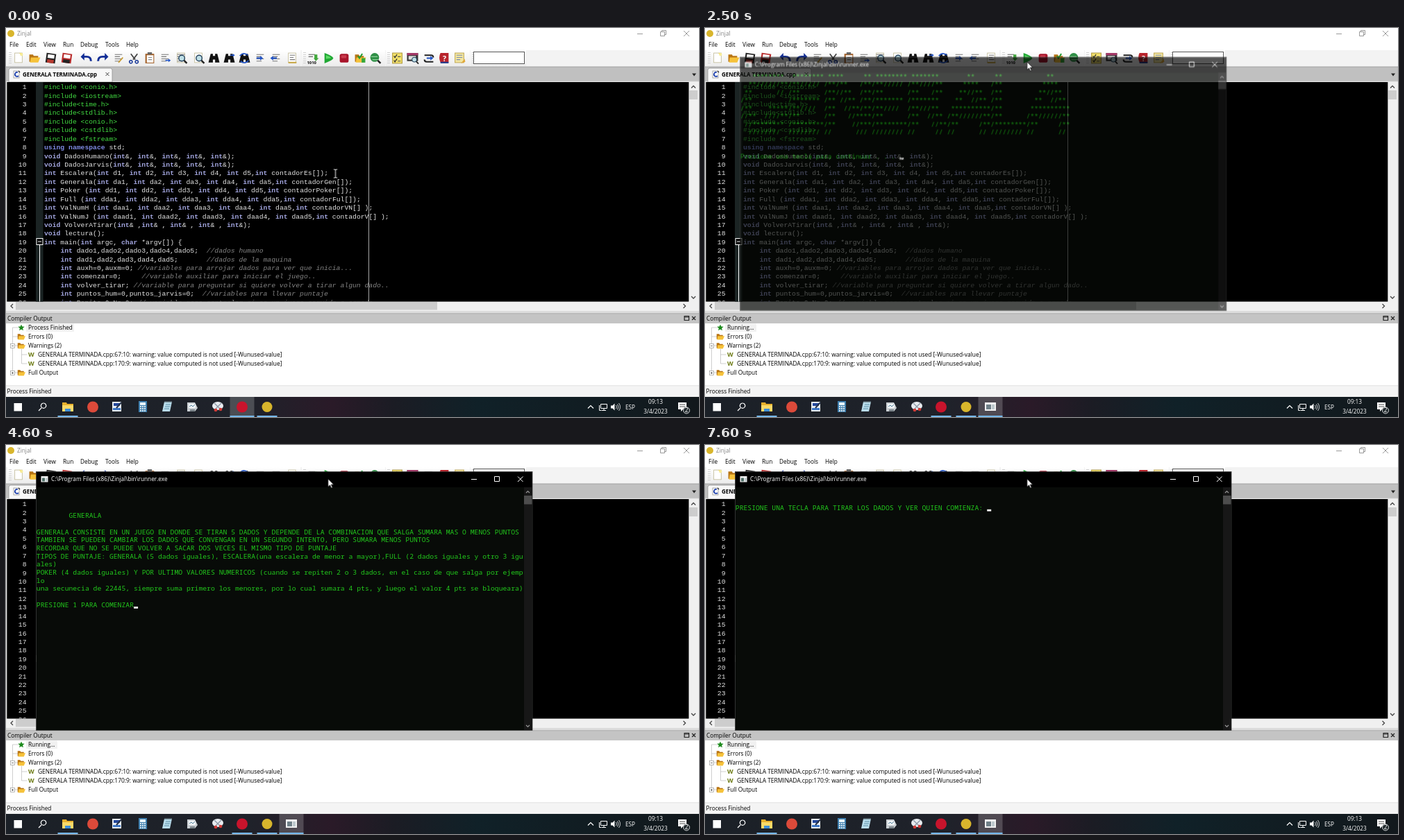
Write an HTML page that moves like this. It is 998 by 561 pixels and loops after 8000 ms.

```html
<!DOCTYPE html>
<html lang="es">
<head>
<meta charset="utf-8">
<title>ZinjaI</title>
<style>
html, body { margin: 0; width: 100%; height: 100%; overflow: hidden; background: #fff; }
svg { display: block; width: 998px; height: 561px; }
text { font: 8.25px "Open Sans", "Noto Sans", sans-serif; white-space: pre; }
.log { font-size: 8.42px; }
.code { font: 9.742px "Liberation Mono", monospace; fill: #e4e4e4; }
.con { font: 9.742px "Noto Sans Mono", "DejaVu Sans Mono", monospace; fill: #22c81c; }
.pre { fill: #42dc42; }
.kw { fill: #7f8be4; font-weight: 700; }
.type { fill: #a3a6e0; font-weight: 700; }
.note { fill: #848484; font-style: italic; }

.a { animation: 8s step-end infinite; }
.hint { animation-name: hint; }
.plain { animation-name: plain; }
.before { animation-name: before; }
.after { animation-name: after; }
.active { animation-name: active; }
.opened { animation-name: opened; }
.ibeam { animation-name: ibeam; }
.arrow { animation-name: arrow; }
.s1 { animation-name: s1; } .s2 { animation-name: s2; } .s3 { animation-name: s3; }
.c1 { animation-name: c1; } .c2 { animation-name: c2; }
.win { animation-name: win; transform-origin: 401px 224.7px; }
.ptr { animation-name: ptr; }
@keyframes hint { 0% { opacity: 0 } 18.75% { opacity: 1 } 21.25%, 100% { opacity: 0 } }
@keyframes plain { 0% { opacity: 1 } 18.75% { opacity: 0 } 21.25%, 100% { opacity: 1 } }
@keyframes before { 0% { opacity: 1 } 23.75%, 100% { opacity: 0 } }
@keyframes after { 0% { opacity: 0 } 23.75%, 100% { opacity: 1 } }
@keyframes active { 0% { opacity: 0 } 23.75% { opacity: 1 } 30%, 100% { opacity: 0 } }
@keyframes opened { 0% { opacity: 0 } 30%, 100% { opacity: 1 } }
@keyframes ibeam { 0% { opacity: 1 } 17.5%, 100% { opacity: 0 } }
@keyframes arrow { 0% { opacity: 0 } 17.5%, 100% { opacity: 1 } }
@keyframes s1 { 0% { opacity: 1 } 55%, 100% { opacity: 0 } }
@keyframes s2 { 0% { opacity: 0 } 55% { opacity: 1 } 81.25%, 100% { opacity: 0 } }
@keyframes s3 { 0% { opacity: 0 } 81.25%, 100% { opacity: 1 } }
@keyframes c1 { 0% { opacity: 1 } 51.25%, 100% { opacity: 0 } }
@keyframes c2 { 0% { opacity: 1 } 70%, 100% { opacity: 0 } }
@keyframes win {
  0% { opacity: 0; transform: scale(.9) }
  30% { opacity: .3; transform: scale(.94) }
  31.25% { opacity: .67; transform: scale(.98) }
  32.5%, 100% { opacity: 1; transform: none }
}
@keyframes ptr {
  0% { transform: translate(474.5px, 210px) }
  11.25% { transform: translate(474.5px, 210px); animation-timing-function: steps(5, jump-start) }
  17.49% { transform: translate(486px, 94px) }
  17.5% { transform: translate(500px, 66px) }
  18.75% { transform: translate(510px, 49px) }
  20% { transform: translate(482px, 55.5px) }
  21.25% { transform: translate(468px, 51px) }
  22.5%, 100% { transform: translate(463.8px, 48.8px) }
}
</style>
</head>
<body>
<svg id="stage" viewBox="0 0 998 561" xmlns="http://www.w3.org/2000/svg"></svg>
<script>
const esc = s => s.replace(/&/g, '&amp;').replace(/</g, '&lt;');
const rect = (x, y, w, h, fill, more = '') => `<rect x="${x}" y="${y}" width="${w}" height="${h}" fill="${fill}" ${more}/>`;
const text = (x, y, s, more = '') => `<text x="${x}" y="${y}" ${more}>${esc(s)}</text>`;
const line = (d, stroke, w = 1, more = '') => `<path d="${d}" fill="none" stroke="${stroke}" stroke-width="${w}" ${more}/>`;
const shape = (d, fill, more = '') => `<path d="${d}" fill="${fill}" ${more}/>`;
const disc = (x, y, r, fill) => `<circle cx="${x}" cy="${y}" r="${r}" fill="${fill}"/>`;
const at = (x, y, s, k = 1) => `<g transform="translate(${x} ${y}) scale(${k})">${s}</g>`;
const anim = (name, s) => `<g class="a ${name}">${s}</g>`;

// Icon parts, centred on the origin
const page = rect(-5, -7, 10, 13, '#fff', 'stroke="#b9b28a" stroke-width=".7"');
const rows = line('M-5-5h10M-5-2h7M-5 1h10M-5 4h7', '#777');
const lens = disc(0, 0, 4, '#bfdfe6') + line('M3 3l4 4', '#222', 2.2) + '<circle r="4" fill="none" stroke="#24425c" stroke-width="1.3"/>';
const folder = shape('M-7-5h5l1 2h6v8h-12z', '#b87414') + shape('M-5-1h13l-3 7h-11z', '#f6c23a');
const floppy = (edge, label) => `<g transform="rotate(8)">${rect(-6, -6.5, 13, 13, edge) + rect(-4, -5, 9, 5, '#fff') + rect(-4, 2, 9, 4.5, label)}</g>`;
const bino = shape('M-7 6l3-12h3v3h3v-3h3l3 12h-6v-4h-3v4z', '#111');
const curve = line('M6 4q0-6-6-6h-4', '#122e96', 2.8) + shape('M-8-2l5-5v10z', '#122e96');
const arrowR = line('M-3 0h6', '#2456c8', 2) + shape('M2-3l4 3-4 3z', '#2456c8');
const flip = s => `<g transform="scale(-1 1)">${s}</g>`;
const check = c => line('M-3 0l2 3 4-6', c, 1.8);

const icons = [
  [18, page + shape('M1-7h4v4z', '#f4d64a') + disc(4, -5, 2, '#f7ec9a')],
  [41, folder],
  [64, floppy('#222', '#b83a30')],
  [87, floppy('#b82a2a', '#222')],
  [116, curve],
  [139, flip(curve)],
  [162, rows + line('M0 6l6-7', '#c79a30', 1.6)],
  [184, line('M-4-6l6 8M5-6l-6 8', '#444', 1.6) + line('M-4 3a2 2 0 1 0 .1 0M4 3a2 2 0 1 0 .1 0', '#23419c', 1.6)],
  [207, rect(-6, -6, 12, 13, '#a4622a') + rect(-4, -4, 9, 10, '#fff') + rect(-3, -8, 6, 3, '#666') + line('M-2-1h5M-2 2h5', '#888')],
  [229, rows + at(3, 3, arrowR, .8)],
  [252, page + rows + at(1, 0, lens)],
  [277, page + at(1, 0, lens)],
  [299, bino],
  [321, bino + at(4, -4, arrowR, .7)],
  [343, bino + line('M-6-3q5-6 11-1M6 3q-5 6-11 1', '#2456c8', 1.6)],
  [366, rows + at(-2, 0, arrowR)],
  [389, rows + at(-2, 0, flip(arrowR))],
  [412, page + line('M-3-4h7M-3-1h5M-3 2h7', '#777') + line('M-5 6h11', '#c8a848', 2)],
  [442, line('M-6-5h9M-6-2h6', '#666') + shape('M2-5h4v5h2l-4 4-3-4h1z', '#41a83c') + text(-8, 8, '1010', 'style="font-size:5.5px;font-weight:700"')],
  [464, shape('M-5-7q11 4 12 7q-1 3-12 7z', '#20a834') + shape('M-3-4q6 2 7 4l-7 1z', '#5cda65')],
  [487, rect(-6, -6, 12, 12, '#a8142a', 'rx="2.5"') + rect(-4, -4, 7, 4, '#c83a4c', 'rx="1"')],
  [510, folder + at(0, -3, check('#1d9c30')) + rect(2, 0, 5, 6, '#35a83a')],
  [532, disc(-1, -1, 6, '#2f8f46') + line('M-6-2h9M-4 2h8', '#8fd09a') + line('M3 3l4 4', '#222', 2.4)],
  [563, rect(-6, -7, 13, 14, '#f2e06a', 'stroke="#b09a40"') + at(-2, -3, check('#333'), .7) + at(-2, 3, check('#333'), .7) + line('M1-2h4M1 4h4', '#555')],
  [586, rect(-8, -7, 15, 11, '#333') + rect(-8, -7, 15, 3, '#a83a6a') + rect(-6, -3, 10, 5, '#ddd') + at(2, 2, lens, .8)],
  [609, line('M-6-4h9q3 0 3 3M6 5h-9q-3 0-3-3', '#222', 2) + arrowR],
  [631, shape('M-5-7h11v13h-11q-3-7 0-13z', '#b8242c') + text(-2, 4, '?', 'style="font-size:10px;font-weight:700" fill="#fff"') + line('M-5 6h11', '#223a8c', 2)],
  [653, rect(-6, -7, 12, 13, '#f3e6a0', 'stroke="#c2aa58"') + line('M-4-4h8M-4-1h8M-4 2h5', '#7a8cae') + shape('M2 7l5-6 1 4z', '#e2a83a')]
];

function frame() {
  const buttons = c => line('M909 8.5h8M976 4l8 8M984 4l-8 8M942.5 5.5h6v6h-6zM944.5 5v-1.5h6v6h-2', c, .8);
  let s = rect(0, 0, 998, 532, '#fff') + disc(7, 8, 5, '#d8b52c');
  s += text(16, 11.3, 'ZinjaI', 'fill="#858585"') + buttons('#808080');
  s += anim('active', text(16, 11.3, 'ZinjaI') + buttons('#000'));
  [['File', 5], ['Edit', 29], ['View', 54], ['Run', 82], ['Debug', 107], ['Tools', 143], ['Help', 173]]
    .forEach(([t, x]) => s += text(x, 27, t));
  s += rect(0, 32, 998, 24, '#f3f3f3');
  [[2, 422], [426, 120], [547, 121], [669, 80]].forEach(([x, w]) => {
    s += rect(x, 32, w, 23, 'url(#bar)') + line(`M${x + 3} 35v17M${x + 5} 35v17`, '#aaa', 1, 'stroke-dasharray="1 2"');
  });
  s += anim('hint', rect(499, 33, 22, 21, '#cfe6fb', 'stroke="#8fc3ee" stroke-width=".8"'));
  icons.forEach(([x, g]) => s += at(x, 43.5, g, 1.06));
  s += rect(673.5, 34.5, 73, 17, '#fff', 'stroke="#555"');
  // tab strip
  s += rect(0, 56, 998, 22, '#c0c0c0') + rect(0, 55.5, 998, 1, '#a2a2a2') + rect(0, 76.8, 998, 1.2, '#e4e4e4');
  s += shape('M4 78v-18l2-2h145l2 2v18z', '#f8f8f8', 'stroke="#8a8a8a" stroke-width=".7"');
  s += rect(11, 62, 8, 10, '#fff', 'stroke="#888" stroke-width=".7"') + line('M17 64a3 3 0 1 0 1 5', '#2446b0', 1.8) + line('M18 62l2 2', '#333', 1.4);
  s += text(24, 69.5, 'GENERALA TERMINADA.cpp', 'style="font-weight:700;font-size:7.9px"');
  s += line('M143.5 64l5 5M148.5 64l-5 5', '#444') + shape('M988 65.5h6l-3 4z', '#222');
  return s;
}

const args = name => [1, 2, 3, 4, 5].map(i => `int ${name}${i}`).join(', ');
const include = h => '#include ' + h;
const source = [
  ...['<conio.h>', '<iostream>'].map(include), '#include<time.h>', '#include<stdlib.h>',
  ...['<conio.h>', '<cstdlib>', '<fstream>'].map(include),
  'using namespace std;',
  'void DadosHumano(int&, int&, int&, int&, int&);',
  'void DadosJarvis(int&, int&, int&, int&, int&);',
  `int Escalera(${args('d')},int contadorEs[]);`,
  `int Generala(${args('da')},int contadorGen[]);`,
  `int Poker (${args('dd')},int contadorPoker[]);`,
  `int Full (${args('dda')},int contadorFul[]);`,
  `int ValNumH (${args('daa')},int contadorVN[] );`,
  `int ValNumJ (${args('daad')},int contadorV[] );`,
  'void VolverATirar(int& ,int& , int& , int& , int&);',
  'void lectura();',
  'int main(int argc, char *argv[]) {',
  '    int dado1,dado2,dado3,dado4,dado5;  //dados humano',
  '    int dad1,dad2,dad3,dad4,dad5;       //dados de la maquina',
  '    int auxh=0,auxm=0; //variables para arrojar dados para ver que inicia...',
  '    int comenzar=0;     //variable auxiliar para iniciar el juego..',
  '    int volver_tirar; //variable para preguntar si quiere volver a tirar algun dado..',
  '    int puntos_hum=0,puntos_jarvis=0;  //variables para llevar puntaje',
  '    int Repite_O_No=0; // variable para controlar si es un juego servido o armado'
];
const paint = s => esc(s).replace(/^#.*|\/\/.*|\b(using|namespace)\b|\b(void|int|char)\b/g, (m, kw, type) =>
  `<tspan class="${kw ? 'kw' : type ? 'type' : m[0] === '#' ? 'pre' : 'note'}">${m}</tspan>`);

function editor() {
  let s = rect(0, 78, 998, 331, '#f0f0f0') + rect(1.3, 78, 982, 316.6, '#000') + rect(43, 78, 10.5, 316.6, '#1b2424');
  s += '<g clip-path="url(#ed)">' + rect(522, 78, 1, 317, '#a8a8a8');
  source.forEach((t, i) => {
    const y = 88.2 + 12.42 * i;
    s += text(29.5, y, String(i + 1), 'class="code" text-anchor="end"');
    s += `<text class="code" x="55" y="${y}">${paint(t)}</text>`;
  });
  s += rect(44, 303.5, 9, 9, '#000', 'stroke="#fff"') + line('M46 308h5M48.5 313v82', '#fff') + '</g>';
  s += rect(984, 90, 12, 13, '#cdcdcd') + rect(14, 395, 607, 11.5, '#cdcdcd');
  s += line('M987 86.5l3-3 3 3M987 387l3 3 3-3M10 398l-3 3 3 3M975.5 398l3 3-3 3', '#444', 1.3);
  s += rect(0, 408, 998, 4, '#dcdcdc');
  return s;
}

function output() {
  let s = rect(0, 412, 998, 14, '#c4c4c4') + rect(0, 411.5, 998, .7, '#9a9a9a') + text(2, 422, 'Compiler Output');
  s += line('M977 415.5h6.5v6h-6.5zM977 417h6.5M988 416l5 5M993 416l-5 5', '#222', 1.2);
  s += rect(1, 426, 996, 90, '#fff');
  s += line('M9.5 432v65M9.5 432h8M9.5 445h8M12 458h6M12 497h6M22.5 463v21M22.5 471h8M22.5 484h8', '#bbb', .7);
  const mark = y => rect(6.5, y - 2.5, 6, 6, '#fff', 'stroke="#999" stroke-width=".7"');
  s += mark(458) + mark(497) + line('M8 458.5h3M8 497.5h3M9.5 496v3', '#444', .7);
  s += shape('M22 427.5l1.3 3 3.4.3-2.6 2.2.8 3.3-2.9-1.800-2.900 1.800.8-3.300-2.600-2.200 3.400-.3z', '#1c8a1c');
  [445, 458, 497].forEach(y => s += at(22, y, folder, .75));
  s += anim('before', rect(29, 426.5, 69, 11.5, '#f1f1f1') + text(32, 434.8, 'Process Finished'));
  s += anim('after', rect(29, 426.5, 45, 11.5, '#f1f1f1') + text(32, 434.8, 'Running...'));
  s += text(32, 447.9, 'Errors (0)') + text(32, 461, 'Warnings (2)') + text(32, 500.2, 'Full Output');
  ['67:10', '170:9'].forEach((p, i) => {
    const y = 474 + 13.1 * i;
    s += text(32, y, 'W', 'style="font-weight:700;font-size:9px" fill="#6c7a14"');
    s += text(46, y, `GENERALA TERMINADA.cpp:${p}: warning: value computed is not used [-Wunused-value]`, 'class="log"');
  });
  s += rect(0, 516, 998, 16, '#f4f4f4') + rect(0, 515.5, 998, .7, '#d4d4d4');
  s += anim('plain', text(1.5, 527, 'Process Finished'));
  s += anim('hint', text(1.5, 527, 'Configura la compilación y ejecución de los programas'));
  return s;
}

function taskbar() {
  const under = x => rect(x - 14.5, 559, 29, 2, '#76b9ed');
  const lit = x => rect(x - 17.5, 532, 35, 29, '#fff', 'opacity=".2"') + rect(x - 17.5, 559, 35, 2, '#76b9ed');
  const white = 'fill="#fff"', mid = 'fill="#fff" text-anchor="middle"';
  let s = rect(0, 532, 998, 29, 'url(#task)');
  s += rect(11.5, 541, 11.5, 11.5, '#fff');
  s += line('M54 541a3.7 3.7 0 1 0 .1 0M51 548l-4 4', '#fff', 1.2);
  s += under(89) + under(376) + anim('before', lit(340)) + anim('after', under(340)) + anim('active', lit(376)) + anim('opened', lit(411));
  s += at(89, 546, shape('M-8-6h6l1 2h9v10h-16z', '#e8b02c') + rect(-8, -2, 16, 9, '#fbd968') + rect(-4, 3, 8, 4, '#3f8fd8'));
  s += disc(125, 546.5, 8, '#dc4a3a');
  s += at(160, 546, rect(-7, -7, 13, 14, '#e8eef4') + rect(-5, -5, 9, 4, '#24489c') + rect(-6, 2, 11, 3, '#3f78c8') + line('M-1 2l7-8', '#27344a', 2));
  s += at(197, 546, rect(-6, -8, 12, 16, '#3f7fae') + rect(-4, -6, 8, 4, '#e8f4fa') + line('M-4 0h8M-4 3h8M-4 6h8', '#dceaf2', 1.8, 'stroke-dasharray="2 1"'));
  s += at(232, 546, shape('M-4-7h11l-3 14h-11z', '#b9dceb') + line('M-2-3h7M-3 0h7M-4 3h7', '#5c90a8') + line('M-4-7h11', '#5a6a72', 1.5));
  s += at(268, 546, shape('M-7-6h11l4 8-4 5h-11z', '#c9ced2') + rect(-5, -4, 10, 6, '#f3f6f8') + line('M-4 0l3-2 2 2 3-3', '#4a7a96') + rect(-3, 4, 7, 3, '#7c858b'));
  s += at(305, 546, '<ellipse cx="0" cy="-1" rx="8" ry="6" fill="#e8ecf0"/>' + line('M-5-5l9 9M5-5l-8 8', '#8c99a6', 1.4) + disc(-3, 5, 2.3, '#d03a36') + disc(4, 4, 2.3, '#d03a36'));
  s += disc(340, 546.5, 8, '#c8142c') + disc(376, 546.5, 7.5, '#d8b52c');
  s += anim('opened', at(411, 546, rect(-8, -6, 16, 12, '#f2f2f2') + rect(-6, -3, 7, 7, '#6f8088') + rect(2, -3, 4, 7, '#bcc8cc')));
  s += line('M838 548.5l4-4 4 4', '#fff', 1.2);
  s += line('M856.5 542.5h9v6h-9zM861 549v2.5M858 551.5h6M854.5 544v7.5h3', '#fff');
  s += shape('M871 544.5h2.5l3-3v10l-3-3h-2.5z', '#fff') + line('M878.5 544q2 2.5 0 5M880.5 542.5q3 4 0 8M882.5 541q4 5.5 0 11', '#fff', .8);
  s += text(892, 549.5, 'ESP', white) + text(935.5, 542.3, '09:13', mid) + text(935.5, 555.5, '3/4/2023', mid);
  s += shape('M968 540h12v10h-5l-3 3v-3h-4z', '#fff') + line('M970 543h8M970 546h8', '#222', .8);
  s += disc(980, 551.5, 5, '#20282c') + '<circle cx="980" cy="551.5" r="4.5" fill="none" stroke="#fff" stroke-width=".8"/>' + text(980, 554.4, '2', mid);
  return s;
}

// Banner letters: width, then eight rows
const glyphs = {
  G: [12, '   ********|  **//////**| **      //|/**|/**    *****|//**  ////**| //********|  ////////'],
  E: [9, ' ********|/**/////|/**|/*******|/**////|/**|/********|////////'],
  N: [12, ' ****     **|/**/**   /**|/**//**  /**|/** //** /**|/**  //**/**|/**   //****|/**    //***|//      ///'],
  R: [10, ' *******|/**////**|/**   /**|/*******|/**///**|/**  //**|/**   //**|//     //'],
  A: [11, '     **|    ****|   **//**|  **  //**| **********|/**//////**|/**     /**|//      //'],
  L: [9, ' **|/**|/**|/**|/**|/**|/********|////////']
};
const banner = [...Array(8).keys()].map(r =>
  [...'GENERALA'].map(c => glyphs[c][1].split('|')[r].padEnd(glyphs[c][0])).join(''));
const pause = 'Presione una tecla para continuar . . . ';
const rules = ['', '', '', '        GENERALA', '',
  'GENERALA CONSISTE EN UN JUEGO EN DONDE SE TIRAN 5 DADOS Y DEPENDE DE LA COMBINACION QUE SALGA SUMARA MAS O MENOS PUNTOS',
  'TAMBIEN SE PUEDEN CAMBIAR LOS DADOS QUE CONVENGAN EN UN SEGUNDO INTENTO, PERO SUMARA MENOS PUNTOS',
  'RECORDAR QUE NO SE PUEDE VOLVER A SACAR DOS VECES EL MISMO TIPO DE PUNTAJE',
  'TIPOS DE PUNTAJE: GENERALA (5 dados iguales), ESCALERA(una escalera de menor a mayor),FULL (2 dados iguales y otro 3 igu',
  'ales)',
  'POKER (4 dados iguales) Y POR ULTIMO VALORES NUMERICOS (cuando se repiten 2 o 3 dados, en el caso de que salga por ejemp',
  'lo',
  'una secunecia de 22445, siempre suma primero los menores, por lo cual sumara 4 pts, y luego el valor 4 pts se bloqueara)',
  '', 'PRESIONE 1 PARA COMENZAR'];
const start = ['', '', 'PRESIONE UNA TECLA PARA TIRAR LOS DADOS Y VER QUIEN COMIENZA: '];

function screen(name, rows, blink) {
  const last = rows.length - 1;
  const body = rows.map((t, i) => t && text(43.8, (70.2 + 11.69 * i).toFixed(2), t, 'class="con"')).join('');
  const caret = rect((43.8 + 5.845 * rows[last].length).toFixed(2), (69.4 + 11.69 * last).toFixed(2), 6, 2.8, '#f2f2f2');
  return anim(name, body + (blink ? anim(blink, caret) : caret));
}

function terminal() {
  let s = rect(43.5, 38.5, 714.5, 373, '#080b08', 'stroke="#3c3c3c" stroke-width=".8"') + rect(44, 39, 713.5, 22, '#000');
  s += rect(50.5, 45, 10, 8.5, '#f2f2f2') + rect(52, 47.5, 4, 5, '#4f7068') + rect(57, 47.5, 2.5, 5, '#bcc8cc');
  s += text(65, 52.3, 'C:\\Program Files (x86)\\ZinjaI\\bin\\runner.exe', 'fill="#fff"');
  s += line('M670 49.5h8M703.5 45.5h7v7h-7zM737 45.5l7.5 7.5M744.5 45.5l-7.5 7.5', '#fff');
  s += rect(746, 61, 11.5, 350, '#171717') + rect(746, 73, 11.5, 12.5, '#4d4d4d');
  s += line('M749 69l2.5-2.5 2.5 2.5M749 404l2.5 2.5 2.5-2.5', '#999', 1.1);
  s += screen('s1', [...banner, '', '', pause], 'c1') + screen('s2', rules, 'c2') + screen('s3', start);
  return anim('win', s);
}

const defs = `<defs>
<linearGradient id="bar" x2="0" y2="1"><stop stop-color="#fff"/><stop offset="1" stop-color="#ececec"/></linearGradient>
<linearGradient id="task"><stop stop-color="#1b2027"/><stop offset=".35" stop-color="#1f222a"/><stop offset=".47" stop-color="#2a1a28"/><stop offset=".56" stop-color="#1b1c24"/><stop offset=".68" stop-color="#102128"/><stop offset="1" stop-color="#12181c"/></linearGradient>
<clipPath id="ed"><rect x="1" y="78" width="982" height="316.6"/></clipPath></defs>`;
const pointer = anim('ptr',
  anim('ibeam', line('M-2.5-6h2l.5.5.5-.5h2M-2.5 6h2l.5-.5.5.5h2M0-6v12', '#fff')) +
  anim('arrow', shape('M0 0v11.5l2.7-2.5 1.9 4.3 1.8-.8-1.9-4.2h3.6z', '#fff', 'stroke="#000" stroke-width=".7"')));

document.getElementById('stage').innerHTML = defs + frame() + editor() + output() + taskbar() + terminal() + pointer;
</script>
</body>
</html>
```
